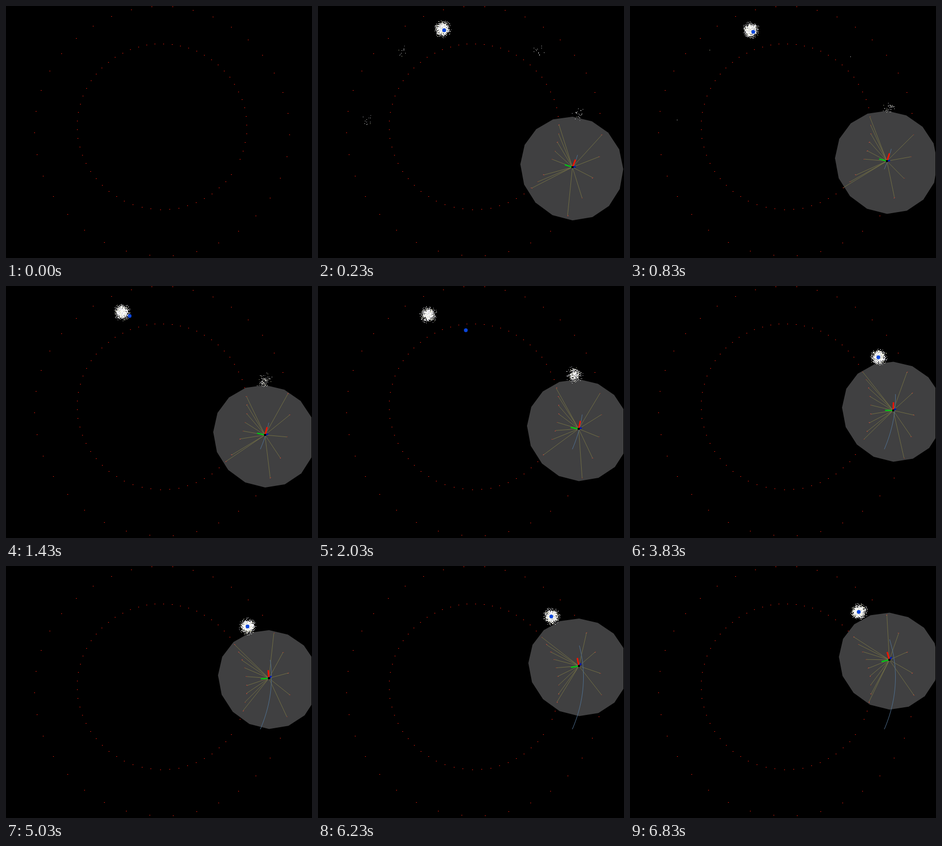
Write an HTML page with a canvas that moves like this. It is 600x494 px and loops after 6860 ms.

```html
<!DOCTYPE html>
<html lang="en">
<head>
<meta charset="utf-8">
<title>Particle filter localisation</title>
<style>
html, body { margin: 0; width: 100%; height: 100%; overflow: hidden; background: #000; }
canvas { display: block; width: 600px; height: 494px; }
</style>
</head>
<body>
<canvas id="stage" width="600" height="494"></canvas>
<script>
const ctx = document.getElementById('stage').getContext('2d');
const { PI, sin, cos, exp, round, floor } = Math;
const TAU = PI * 2;
const LOOP = 6860;
const COUNT = 1900;
const TINTS = ['#fff', '#fff', '#fff', '#fff', '#f4f4f0', '#e4e4f0', '#e8e8c0', '#a8a8b0'];
const STRAYS = [[432, 88], [167, 89], [96, 223]];

function seeded(seed) {
  let s = seed;
  return () => {
    s = (s + 0x6D2B79F5) | 0;
    let t = Math.imul(s ^ (s >>> 15), 1 | s);
    t = (t + Math.imul(t ^ (t >>> 7), 61 | t)) ^ t;
    return ((t ^ (t >>> 14)) >>> 0) / 4294967296;
  };
}

// Ring of landmarks seen in slight perspective.
function ring(count, r, phase, k) {
  return Array.from({ length: count }, (_, i) => {
    const a = phase + i * TAU / count;
    const s = 1 / (1 - k * sin(a));
    return [305.9 + r * cos(a) * s, 229.5 + r * 0.977 * sin(a) * s + r * 0.005 * cos(a)];
  });
}
const inner = ring(60, 166, 0.0195, 0.045);
inner.splice(5, 1);
const marks = [...inner, ...ring(36, 249.3, 0.09, 0.065)];

// Motion per step.
const robotAt = n => [516.3 - 0.4 * (n - 6.6) ** 2, 316 - 12 * n];
const trailX = y => 520.5 - 0.0021 * (y - 218) ** 2;
const orbit = (r, a) => [306 + r * cos(a), 239.6 - r * sin(a)];
const rightAt = n => orbit(207, 0.14 + 0.061 * n);
const leftAt = n => orbit(204.5, PI / 2 + 0.309 + 0.032 * n + 0.0055 * n * n);
const rightShare = n => 1 / (1 + exp(4.3 - 0.36 * n * n));

function line(x1, y1, x2, y2, color, width) {
  ctx.strokeStyle = color;
  ctx.lineWidth = width;
  ctx.beginPath();
  ctx.moveTo(x1, y1);
  ctx.lineTo(x2, y2);
  ctx.stroke();
}

function speck(x, y, rnd) {
  ctx.fillStyle = TINTS[floor(rnd() * TINTS.length)];
  ctx.fillRect(round(x), round(y), 1, 1);
}

function cloud([x, y], count, rnd) {
  for (let i = 0; i < count; i++) {
    const r = 5.3 * Math.min(3.2, Math.sqrt(-2 * Math.log(1 - rnd())));
    const a = rnd() * TAU;
    speck(x + r * cos(a), y + r * sin(a), rnd);
  }
}

function ball(x, y) {
  ctx.fillStyle = '#0a46dc';
  ctx.beginPath();
  ctx.arc(x, y, 3.7, 0, TAU);
  ctx.fill();
}

function drawDisc(x, y, rx, ry) {
  ctx.fillStyle = 'rgba(128,128,130,0.5)';
  ctx.beginPath();
  for (let i = 0; i < 16; i++) {
    const c = cos(i * TAU / 16), s = sin(i * TAU / 16);
    ctx.lineTo(x + rx * s * (1 - 0.015 * c) - 1.5 * s * s,
      y + 4.8 * s - ry * c + 3.6 * c * c);
  }
  ctx.fill();
}

function drawTrail(endY) {
  ctx.strokeStyle = '#507090';
  ctx.lineWidth = 1;
  ctx.beginPath();
  for (let y = 320; y >= endY; y -= 4) ctx.lineTo(trailX(y), y);
  ctx.stroke();
}

function drawRobot(n, rnd) {
  const [x, y] = robotAt(n);
  const rx = 99.2 + (y - 244) * 0.024;
  const ry = 98 + (y - 244) * 0.05;
  drawDisc(x + 0.3, y - 1, rx, ry);

  for (const [mx, my] of marks) {
    if (((mx - x) / rx) ** 2 + ((my - y) / ry) ** 2 > 1) continue;
    const ex = mx + (rnd() - 0.5) * 2, ey = my + (rnd() - 0.5) * 2;
    line(x, y, ex, ey, 'rgba(135,130,70,0.7)', 1);
    ctx.fillStyle = '#8c4030';
    ctx.fillRect(floor(ex), floor(ey), 2, 1);
  }
  drawTrail(y - 24 - n * 1.6);

  const a = (22 - 3.4 * n) * PI / 180;
  line(x, y, x + 16 * sin(a), y - 16 * cos(a), '#f01400', 3);
  line(x, y, x - 16 * cos(a), y - 13 * sin(a), '#00c814', 2.5);
  line(x, y, x + 6.5 - n * 0.2, y - 1 - n * 0.4, '#0014b4', 3);
  ctx.fillStyle = '#000';
  ctx.fillRect(x - 2, y - 2, 4, 4);
}

function drawUniform(rnd) {
  for (let i = 0; i < COUNT; i++) speck(1 + rnd() * 597, rnd() * 493, rnd);
  ball(300, 247);
}

// Two hypotheses share the particles; the ball marks their mean.
function drawParticles(n, rnd) {
  const share = rightShare(n);
  const [lx, ly] = leftAt(n), [rx, ry] = rightAt(n);
  for (const p of STRAYS) cloud(p, round(12 * 0.1 ** n), rnd);
  cloud([lx, ly], round(COUNT * (1 - share)), rnd);
  cloud([rx, ry], round(COUNT * share), rnd);
  ball(lx + (rx - lx) * share, ly + (ry - ly) * share + 0.5);
}

// Step -2 shows the map alone, -1 the uniform start.
function draw(step) {
  ctx.fillStyle = '#000';
  ctx.fillRect(0, 0, 600, 494);
  ctx.fillStyle = '#d21a0a';
  for (const [x, y] of marks) ctx.fillRect(floor(x - 0.5), floor(y), 2, 1);
  if (step < -1) return;

  const rnd = seeded(71 + step * 13);
  drawRobot(Math.max(step, 0), rnd);
  if (step < 0) drawUniform(rnd);
  else drawParticles(step, rnd);
  ctx.fillStyle = '#000';
  ctx.fillRect(599, 0, 1, 494);
}

function stepAt(t) {
  if (t < 30) return -2;
  return t < 230 ? -1 : floor((t - 230) / 600);
}

const start = performance.now();
let shown = null;
function tick() {
  const step = stepAt((performance.now() - start) % LOOP);
  if (step !== shown) draw(shown = step);
  requestAnimationFrame(tick);
}
tick();
</script>
</body>
</html>
```
